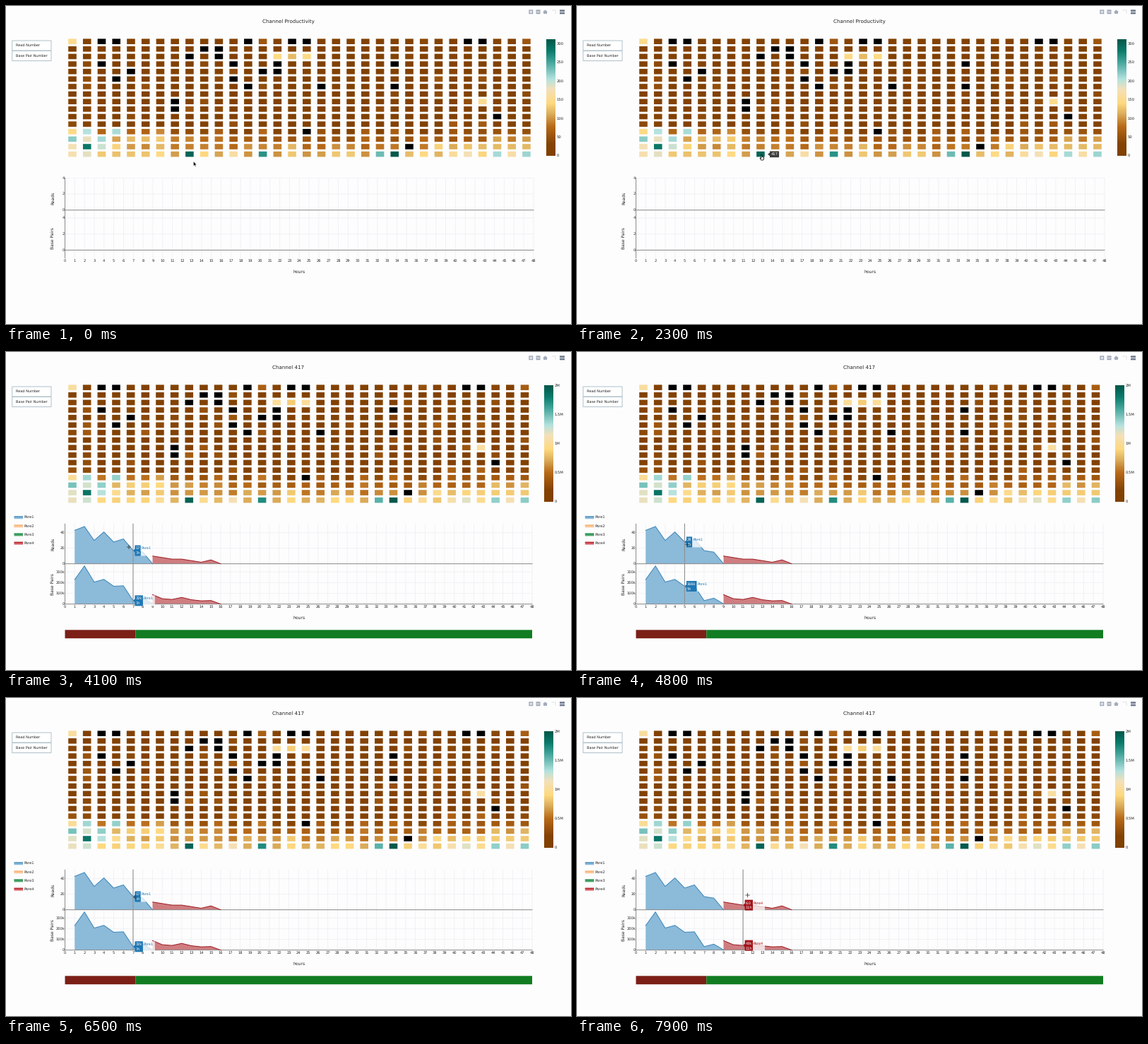
These frames come from a looping animation (800x450 px, 8000 ms). A matplotlib script:

```python
import matplotlib.pyplot as plt
import numpy as np
from matplotlib.animation import FuncAnimation
from matplotlib.collections import PatchCollection
from matplotlib.colors import LinearSegmentedColormap
from matplotlib.patches import Polygon, Rectangle

W, H, DPI = 800, 450, 100
FRAMES, STEP = 80, 100
CLICK = 2800
BG = "#fdfdfe"
INK = "#222222"
LEFT, TOP, BOTTOM = 83.5, 243.3, 356.7

plt.rcParams["font.family"] = "DejaVu Sans"
plt.rcParams["text.hinting"] = "none"
fig = plt.figure(figsize=(W / DPI, H / DPI), dpi=DPI, facecolor=BG)


def layer():
    ax = fig.add_axes([0, 0, 1, 1])
    ax.set(xlim=(0, W), ylim=(H, 0))
    ax.axis("off")
    return ax


def text(ax, x, y, s, px=5.1, color=INK, ha="center", **kw):
    return ax.text(x, y, s, fontsize=px * 72 / DPI, color=color, ha=ha,
                   va="center", **kw)


def box(ax, x0, y0, x1, y1, color, edge="none", **kw):
    return ax.add_patch(Rectangle((x0, y0), x1 - x0, y1 - y0, fc=color,
                                  ec=edge, snap=False, **kw))


def line(ax, xs, ys, color, px=1, **kw):
    return ax.plot(xs, ys, color=color, lw=px * 72 / DPI, snap=False, **kw)[0]


def poly(ax, pts, color, edge="none", px=0.5, **kw):
    return ax.add_patch(Polygon(pts, fc=color, ec=edge, lw=px * 72 / DPI, **kw))


# Heatmap: quiet channels above, busy ones below and towards both sides
ROWS, COLS = 16, 32
CMAP = LinearSegmentedColormap.from_list("pores", [
    (0, "#804000"), (0.1, "#844305"), (0.25, "#b86a18"), (0.36, "#dcae5c"),
    (0.45, "#fed97f"), (0.57, "#f4e0b8"), (0.66, "#b4e2de"),
    (0.8, "#48a89e"), (0.9, "#0c7c6c"), (1, "#00584a")])

DEAD = {0: (2, 3, 12, 15, 16, 27, 28), 1: (9, 10), 2: (8, 10),
        3: (2, 11, 14, 22), 4: (4, 13, 14), 5: (3, 11), 6: (12, 17, 22),
        8: (7,), 9: (7,), 10: (29,), 12: (16,), 14: (23,)}
HOT = {(0, 0): 150, (2, 14): 145, (2, 15): 120, (2, 16): 145, (8, 28): 150,
       (12, 1): 205, (12, 3): 210, (13, 2): 212, (14, 1): 285, (15, 8): 300,
       (15, 13): 265, (15, 21): 235, (15, 22): 310}

rng = np.random.default_rng(17)
row, col = np.mgrid[:ROWS, :COLS]
depth = np.clip((row - 10) / 5, 0, 1)
from_left = np.exp(-col / 4.5) * np.exp(-((row - 13.2) / 1.5) ** 2)
from_right = np.exp((col - COLS + 1) / 5) * depth
reads = 10 + 45 * rng.random((ROWS, COLS)) ** 6
reads += (95 * depth ** 2 + 160 * from_left + 75 * from_right) \
    * rng.uniform(0.8, 1.2, (ROWS, COLS))
for spot, count in HOT.items():
    reads[spot] = count
read_share = np.clip(reads / 312, 0, 1)
base_share = read_share ** 0.9


def heatmap(ax, share, pitch):
    patches, colors = [], []
    for r in range(ROWS):
        for c in range(COLS):
            x, y = 94 + pitch * c, 50.2 + 10.63 * r
            patches.append(Rectangle((x - 5.8, y - 3.8), 11.6, 7.6))
            colors.append("black" if c in DEAD.get(r, ()) else CMAP(share[r, c]))
    ax.add_collection(PatchCollection(patches, facecolors=colors, linewidths=0,
                                      snap=False))


def colorbar(ax, x, ticks):
    ramp = np.linspace(1, 0, 165)[:, None]
    ax.imshow(ramp, cmap=CMAP, extent=(x, x + 13, 212, 47.3), aspect="auto")
    ax.set(xlim=(0, W), ylim=(H, 0))
    for share, label in ticks:
        text(ax, x + 14.3, 212 - 164.7 * share, label, 5.2, ha="left")


def toolbar(ax):
    gray = "#a3abbb"
    for x in (743.3, 753.5):
        box(ax, x - 3, 5.3, x + 3, 11.3, gray)
        line(ax, [x - 1.7, x + 1.7], [8.3, 8.3], "white", 0.9)
    line(ax, [743.3, 743.3], [6.6, 10], "white", 0.9)
    poly(ax, [(760, 8.4), (763.5, 5.4), (767, 8.4), (766, 8.4), (766, 11),
              (761, 11), (761, 8.4)], gray)
    line(ax, [773, 778, 778], [6, 6, 10.5], gray, 0.8, ls=":")
    for y in (5.3, 8.8):
        box(ax, 784, y, 791, y + 2.6, "#6f7b8b")


def frame(ax, title, right, yticks):
    toolbar(ax)
    text(ax, 400, 21.8, title, 7.1)
    for y, label in ((49, "Read Number"), (63.6, "Base Pair Number")):
        box(ax, 8.7, y, 64, y + 14, "white", "#a9bcc4", lw=0.65)
        text(ax, 13.5, y + 7, label, 5, ha="left")
    hour = (right - LEFT) / 48
    for h in range(49):
        x = LEFT + hour * h
        line(ax, [x, x], [TOP, BOTTOM], "#f0f0f3", 0.8, zorder=0.5)
        text(ax, x, 360.3, str(h))
    for y, label in yticks:
        line(ax, [LEFT, right], [y, y], "#f0f0f3", 0.8, zorder=0.5)
        text(ax, 83, y, label, ha="right")
        if label == "0":
            line(ax, [LEFT, right], [y, y], "#808080", 0.9)
    line(ax, [LEFT, LEFT], [TOP, BOTTOM], "#808080", 0.9)
    text(ax, 66.5, 271.5, "Reads", 6, rotation=90)
    text(ax, 66.5, 328.5, "Base Pairs", 6, rotation=90)
    text(ax, 415.5, 376.5, "hours", 6.1)


# Overview of all channels
overview = layer()
heatmap(overview, read_share, 20.74)
colorbar(overview, 765, [(v / 312, str(v)) for v in range(0, 301, 50)])
frame(overview, "Channel Productivity", 747,
      [(zero - 11.35 * v, str(v)) for zero in (288.8, 345.4) for v in (0, 2, 4)])

# Single channel view
HOUR = (745 - LEFT) / 48
PORES = {
    "Pore1": dict(start=1, fill="#8cbad9", edge="#3a86b9", tip="#1f77b4",
                  reads=[43, 48, 30, 41, 28, 32, 17, 15, 0],
                  bases=[228, 355, 205, 230, 166, 170, 32, 55, 2]),
    "Pore4": dict(start=9, fill="#cf7d80", edge="#9c1c22", tip="#a2141a",
                  reads=[10, 8, 6, 6, 4, 2, 5, 0],
                  bases=[88, 50, 43, 62, 40, 30, 33, 0]),
}
SCALE = {"reads": (299.7, 1.1), "bases": (356.7, 0.152)}


def hour_x(h):
    return LEFT + HOUR * h


def value_y(kind, v):
    zero, unit = SCALE[kind]
    return zero - unit * v


detail = layer()
heatmap(detail, base_share, 20.66)
colorbar(detail, 762, [(i / 4, s) for i, s in
                       enumerate(("0", "0.5M", "1M", "1.5M", "2M"))])
frame(detail, "Channel 417", 745,
      [(value_y("reads", v), str(v)) for v in (0, 20, 40)]
      + [(value_y("bases", v), f"{v}k" if v else "0") for v in range(0, 301, 100)])

for pore in PORES.values():
    for kind in SCALE:
        ys = [value_y(kind, v) for v in pore[kind]]
        xs = [hour_x(pore["start"] + i) for i in range(len(ys))]
        zero = SCALE[kind][0]
        poly(detail, [(xs[0], zero), *zip(xs, ys), (xs[-1], zero)], pore["fill"])
        line(detail, xs, ys, pore["edge"], 1)

LEGEND = [("#8cbad9", "#3a86b9"), ("#fcc797", "#f6b070"),
          ("#4aa56a", "#1d8a45"), ("#d4595d", "#b02228")]
for i, (fill, edge) in enumerate(LEGEND):
    y = 234 + 12.1 * i
    box(detail, 11.5, y - 1.5, 24, y + 2.2, fill)
    line(detail, [11.5, 24], [y - 1, y - 1], edge, 1.2, solid_capstyle="butt")
    text(detail, 26, y, f"Pore{i + 1}", ha="left")

box(detail, 83.5, 393.3, 183.3, 405.2, "#7b1f17")
box(detail, 183.3, 393.3, 745, 405.2, "#117c21")

# Pointer and hover labels; each move is (start, end, x, y)
HOME = np.array([265.5, 220])
MOVES = [(300, 900, 261.5, 211), (3100, 4000, 174, 276), (4400, 5100, 145, 270),
         (5600, 6400, 183, 282), (6700, 7800, 241.5, 279)]
ARROW = [(0, 0), (0, 6.4), (1.5, 5.1), (2.5, 7.4), (3.5, 6.9), (2.5, 4.8),
         (4.5, 4.7)]
HAND = [(-0.7, 0), (0.5, 0), (0.5, 2.4), (3, 3), (3.1, 5.2), (2.2, 7),
        (-0.8, 7), (-2.4, 4.4), (-1.8, 3.8), (-0.7, 4.6)]
top = layer()
live = []


def pointer_at(t):
    pos = HOME
    for start, end, *goal in MOVES:
        u = np.clip((t - start) / (end - start), 0, 1)
        pos = pos + (goal - pos) * u * u * (3 - 2 * u)
    return pos


def draw_pointer(x, y):
    if y >= TOP:
        live.append(line(top, [x - 2.7, x + 2.7], [y, y], "#333333", 0.8, zorder=9))
        live.append(line(top, [x, x], [y - 2.7, y + 2.7], "#333333", 0.8, zorder=9))
        return
    shape, fill, edge, px = ((HAND, "white", "black", 0.8) if y < 216
                             else (ARROW, "black", "white", 0.4))
    pts = [(x + dx, y + dy) for dx, dy in shape]
    live.append(poly(top, pts, fill, edge, px, zorder=9))


def channel_tip():
    pts = [(270, 209.8), (273, 207.5), (273, 205.5), (286, 205.5), (286, 214.2),
           (273, 214.2), (273, 212)]
    live.append(poly(top, pts, "#3c3c3c"))
    live.append(text(top, 279.5, 209.9, "417", 5.2, "white"))


def hour_tip(name, kind, h):
    pore = PORES[name]
    v = pore[kind][h - pore["start"]]
    label = f"{v}k" if kind == "bases" else str(v) if v >= 10 else f"{v:.1f}"
    x, y = hour_x(h) + 2.5, value_y(kind, v)
    end = x + 1.8 + 3.2 * max(len(label), len(f"{h}h"))
    live.append(box(top, end, y - 7.5, end + 17, y + 7.5, "white", alpha=0.75))
    pts = [(x - 2.5, y), (x, y - 2.5), (x, y - 7.5), (end, y - 7.5),
           (end, y + 7.5), (x, y + 7.5), (x, y + 2.5)]
    live.append(poly(top, pts, pore["tip"]))
    live.append(text(top, x + 1, y - 3, label, 5, "white", ha="left"))
    live.append(text(top, x + 1, y + 4, f"{h}h", 5, "white", ha="left"))
    live.append(text(top, end + 1, y - 3, name, 5, pore["tip"], ha="left"))


def update(i):
    while live:
        live.pop().remove()
    t = i * STEP
    clicked = t >= CLICK
    overview.set_visible(not clicked)
    detail.set_visible(clicked)
    x, y = pointer_at(t)
    if y < 213.5 and abs(x - 260) < 6:
        channel_tip()
    if clicked and y >= TOP:
        h = round((x - LEFT) / HOUR)
        if 1 <= h <= 16:
            live.append(line(top, [hour_x(h)] * 2, [TOP, BOTTOM], "#909090", 1.1))
            for kind in SCALE:
                hour_tip("Pore1" if h < 9 else "Pore4", kind, h)
    draw_pointer(x, y)
    return live


anim = FuncAnimation(fig, update, frames=FRAMES, interval=STEP, repeat=True,
                     repeat_delay=0, blit=False)
plt.show()
```
